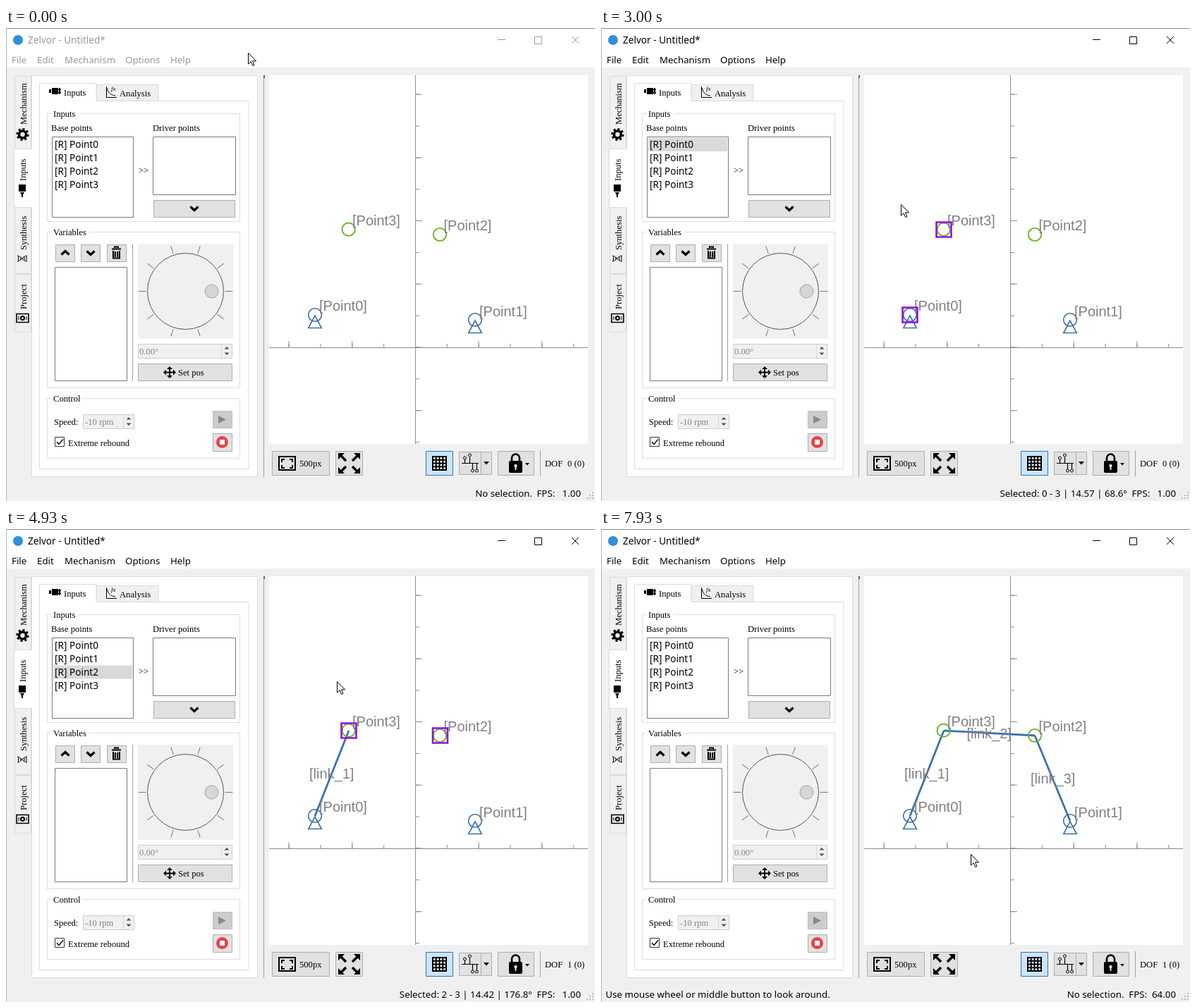
These frames come from a looping animation (835x671 px, 8000 ms). An HTML page:

```html
<!DOCTYPE html>
<html lang="en">
<head>
<meta charset="utf-8">
<title>Linkage editor</title>
<style>
html, body { margin: 0; width: 100%; height: 100%; overflow: hidden; background: #f0f0f0; }
svg { display: block; width: 835px; height: 671px; }
text { white-space: pre; }
.ui { font: 13.3px "Noto Sans", "Open Sans", sans-serif; }
.list { font-size: 13.6px; }
.serif { font: 12.6px "Liberation Serif", "Noto Serif", serif; }
.label { font: 20px "Liberation Sans", Arial, sans-serif; fill: #808080; }
.end { text-anchor: end; }
.btn { fill: #e1e1e1; stroke: #adadad; }
.off { fill: #ccc; stroke: #bfbfbf; }
.box { fill: #fff; stroke: #7a7a7a; }
.group { fill: none; stroke: #dcdcdc; }
.tab { fill: #f0f0f0; stroke: #d9d9d9; }
.page { fill: #fff; stroke: #dcdcdc; }
.spin { fill: #f0f0f0; stroke: #ccc; }
.dim { fill: #838383; }
.ink { fill: none; stroke: #000; }
.axis { fill: none; stroke: #8c8c8c; }
.ground { fill: none; stroke: #3a70a8; stroke-width: 1.6; }
.joint { fill: none; stroke: #63b51e; stroke-width: 1.8; }
.link { stroke: #3c72ad; stroke-width: 2.8; }
.pick { fill: none; stroke: #9112dc; stroke-width: 2.6; }
.row { fill: #d9d9d9; }
#band { fill: none; stroke: #a0a0a4; }
</style>
</head>
<body>
<svg viewBox="0 0 835 671">
<defs>
  <g id="frame">
    <path fill="none" stroke="currentColor" d="M697 16.5h11M749.5 12.5h10v10h-10zM802 12l10 10M812 12l-10 10"/>
    <g class="ui" fill="currentColor">
      <text class="list" x="31" y="22">Zelvor - Untitled*</text>
      <text x="8" y="50">File</text><text x="44" y="50">Edit</text>
      <text x="83" y="50">Mechanism</text><text x="169" y="50">Options</text><text x="233" y="50">Help</text>
    </g>
  </g>
  <g id="menu" class="ui">
    <path fill="#000" opacity=".35" d="M4 4h164v98H4z"/>
    <path fill="#f2f2f2" stroke="#c4c4c4" d="M.5.5h166v100H.5z"/>
    <path stroke="#000" stroke-width="2" fill="none" d="M9 10l5 9 6-10"/>
    <path d="M6 7h5v5H6zM18 6h5v5h-5zM12 17h4v4h-4zM149 53l4 3.5-4 3.5z"/>
    <path stroke="#c8c8c8" d="M29 72.5h135"/>
    <text x="33" y="18">New Link</text><text x="142" y="18">L</text>
    <text x="33" y="40">Grounded</text><text x="33" y="62">Multiple joint</text><text x="33" y="92">Delete</text>
  </g>
  <path id="chev" fill="none" stroke="#000" stroke-width="3.2" d="M-5.5-2.5L0 2.5 5.5-2.5"/>
  <path id="arrows" fill="#505050" d="M-3.5-2.5L0-6 3.5-2.5zM-3.5 2.5L0 6 3.5 2.5z"/>
  <g id="base" class="ground"><circle r="9.3"/><path d="M0 1L-9.3 18.5H9.3z"/></g>
  <circle id="joint" class="joint" r="9.2"/>
  <path id="pick" class="pick" d="M-10.5-10.5h21v21h-21z"/>
</defs>

<!-- window -->
<path fill="#f0f0f0" d="M0 0h835v671H0z"/>
<path fill="#fff" d="M0 0h835v56H0z"/>
<path stroke="#8a8a8a" fill="none" d="M0 .5h835"/>
<path stroke="#b4b4b4" fill="none" d="M.5 0v671"/>
<circle cx="17" cy="17" r="7" fill="#2f8fd8"/>
<use href="#frame" color="#999" data-on="0-2300"/>
<use href="#frame" color="#000" data-on="2300-8000"/>

<!-- side tabs -->
<path class="page" d="M36.5 67.5h320v569h-320z"/>
<path class="tab" d="M12.5 68.5h23v103h-23zM12.5 254.5h23v94h-23zM12.5 349.5h23v82h-23z"/>
<path fill="#fff" d="M11 172h27v82H11z"/><path class="group" d="M36 171.5H11.5v83H36"/>
<g class="serif">
  <text transform="translate(29 137) rotate(-90)">Mechanism</text>
  <text transform="translate(28 217) rotate(-90)">Inputs</text>
  <text transform="translate(29 315) rotate(-90)">Synthesis</text>
  <text transform="translate(29 399) rotate(-90)">Project</text>
</g>
<g class="ink">
  <circle cx="23.500" cy="151" r="5" stroke-width="3.600"/>
  <circle cx="23.500" cy="151" r="7.600" stroke-width="3" pathLength="16" stroke-dasharray="1"/>
  <path d="M16 323c5 0 8 8 14 8M16 331c5 0 8-8 14-8M17.500 324v6M21 325v4M26 325v4M29 324v6"/>
  <path stroke-width="1.600" d="M15 405.500h17v12H15z"/><circle cx="23.500" cy="411.500" r="2.500" stroke-width="2"/>
  <path d="M18 409v5M29 409v5"/>
</g>
<path d="M18 222h10v10H18zM20 233h6l-1.500 3h-3zM22 236h2v4h-2z"/>

<!-- inputs page -->
<path class="page" d="M47.5 103.500h296.500v522H47.500z"/>
<path class="tab" d="M128.500 80.500h87.500v23h-87.500z"/>
<path fill="#fff" d="M48 78h80v27H48z"/><path class="group" d="M47.500 104V78.500h80.500V103"/>
<path d="M61 87h3v5h-3zM65 85h9v9h-9zM75 85h2v9h-2z"/><path class="ink" stroke-width="1.500" d="M74 87.500h4M74 91.500h4"/>
<path class="ink" d="M142.500 83v15.500H157M143 85c2 7 5 10 12 11"/>
<text x="149" y="89" font-family="Liberation Serif, serif" font-size="9" font-style="italic">fx</text>
<path class="group" d="M58.500 121.500h273v153h-273zM58.500 289.500h273v221h-273zM58.500 525.500h273v85h-273z"/>
<path fill="#fff" d="M64 119h39v5H64zM64 287h54v5H64zM64 523h44v5H64z"/>
<g class="serif">
  <text x="82" y="96">Inputs</text><text x="161" y="97">Analysis</text>
  <text x="67" y="126">Inputs</text><text x="64" y="146">Base points</text><text x="208" y="146">Driver points</text>
  <text x="188" y="206">&gt;&gt;</text>
  <text x="67" y="294">Variables</text><text x="67" y="530">Control</text>
</g>
<path class="box" d="M65.500 154.500h115v114h-115zM208.500 154.500h117v82h-117zM69.500 339.500h102v161h-102z"/>
<path class="row" data-on="2890-3670" d="M67 156h112v19H67z"/>
<path class="row" data-on="5970-7000" d="M67 174.500h112v19H67z"/>
<path class="row" data-on="4090-5230" d="M67 193.500h112v19H67z"/>
<g class="ui list">
  <text class="list" x="69" y="170">[R] Point0</text><text class="list" x="69" y="189">[R] Point1</text>
  <text class="list" x="69" y="208">[R] Point2</text><text class="list" x="69" y="227">[R] Point3</text>
</g>
<path class="btn" d="M209.500 244.500h115v24h-115zM70.500 307.500h27v24h-27zM106.500 307.500h27v24h-27zM143.500 307.500h27v24h-27zM187.500 476.500h133v24h-133zM293.500 575.500h27v25h-27z"/>
<use href="#chev" x="267" y="256"/>
<use href="#chev" transform="translate(84 319) scale(1 -1)"/>
<use href="#chev" x="120" y="319"/>
<path class="ink" stroke-width="2" d="M150 313.500h13M154 312v-1.500h5v1.500M152 316v10.500h9V316M154.800 317v8M158.200 317v8"/>
<path stroke="#a0a0a0" d="M179.500 306v195"/>

<!-- dial -->
<path fill="#f0f0f0" d="M187 306h135v135H187z"/>
<circle cx="254.500" cy="373.500" r="54" fill="none" stroke="#555"/>
<circle cx="254.500" cy="373.500" r="61.500" fill="none" stroke="#777" stroke-width="11" pathLength="360" stroke-dasharray=".9 35.1" stroke-dashoffset=".45"/>
<circle cx="291.500" cy="373.500" r="9.500" fill="#d6d6d6" stroke="#a2a2a2"/>
<path class="spin" d="M187.500 448.500h133v20h-133zM109.500 548.500h72v20h-72z"/>
<path stroke="#d8d8d8" fill="none" d="M305.500 449v19M166.500 549v19"/>
<use href="#arrows" x="313" y="458"/><use href="#arrows" x="174" y="558"/>
<path class="ink" stroke-width="2" d="M232 482v13M225.500 488.500h13"/>
<path d="M232 480l4 4h-8zM232 497l4-4h-8zM223 488.500l4-4v8zM241 488.500l-4-4v8z"/>
<g class="serif">
  <text class="dim" x="189" y="463">0.00°</text><text x="244" y="493">Set pos</text>
  <text x="68" y="563">Speed:</text><text class="dim" x="112" y="563">-10 rpm</text>
  <text x="88" y="593">Extreme rebound</text>
</g>
<path class="btn off" d="M293.500 543.500h27v24h-27z"/><path fill="#888" d="M301 550l11 5.500-11 5.500z"/>
<circle cx="306.500" cy="587.500" r="8.500" fill="#e5444b"/><path fill="#fff" d="M303 584h7v7h-7z"/>
<path fill="#fff" stroke="#333" d="M69.500 580.500h13v13h-13z"/><path class="ink" stroke-width="1.400" d="M72 587l3 3.500 6-7"/>
<path stroke="#a0a0a0" d="M365.500 67v570"/><path stroke="#606060" stroke-width="2" d="M366 67v4"/>

<!-- canvas -->
<path fill="#fff" d="M373 67h452v523H373z"/>
<g class="axis">
  <path d="M373 453.500h452M580.500 67v523"/>
  <path stroke-width="5" stroke-dasharray="1 43.85" d="M400.600 450.500H824"/>
  <path stroke-width="9" stroke-dasharray="1 88.700" d="M400.600 448.500H824"/>
  <path stroke-width="5" stroke-dasharray="1 43.850" d="M583.500 93.700V590"/>
  <path stroke-width="9" stroke-dasharray="1 88.700" d="M585.500 93.700V590"/>
</g>
<g data-on="3670-8000"><path class="link" d="M438 407L486 286"/><text class="label" x="430" y="354">[link_1]</text></g>
<g data-on="5230-8000"><path class="link" d="M486 286L615 293"/><text class="label" x="518.500" y="297">[link_2]</text></g>
<g data-on="7000-8000"><path class="link" d="M615 293L665 414"/><text class="label" x="609" y="361">[link_3]</text></g>
<use href="#base" x="438" y="407"/><use href="#base" x="665" y="414"/>
<use href="#joint" x="615" y="293"/><use href="#joint" x="485.700" y="285.700"/>
<g class="label">
  <text x="444" y="401">[Point0]</text><text x="671" y="409">[Point1]</text>
  <text x="620.500" y="287">[Point2]</text><text x="491" y="280">[Point3]</text>
</g>
<use href="#pick" x="438" y="407" data-on="2890-3670"/>
<use href="#pick" x="665.500" y="414.500" data-on="5970-7000"/>
<use href="#pick" x="615.500" y="293" data-on="4090-5230 6135-7000"/>
<use href="#pick" x="486" y="286" data-on="2843-3670 4560-5230"/>
<rect id="band"/>

<!-- tool row -->
<path class="btn" d="M377.500 600.500h81v34h-81zM467.500 600.500h38v34h-38zM642.500 601.500h46v32h-46zM697.500 600.500h51v34h-51z"/>
<path fill="#cce4f7" stroke="#2a76b8" d="M595.500 600.500h38v34h-38z"/>
<path class="ink" stroke-width="2" d="M387 608h23v19h-23z"/>
<path class="ink" stroke-width="2" d="M391 616v-4h4M402 612h4v4M406 620v4h-4M395 624h-4v-4"/>
<path class="ink" stroke-width="3.500" d="M474 606l8 8M499 606l-8 8M474 630l8-8M499 630l-8-8"/>
<path d="M471 603h9l-9 9zM502 603v9l-9-9zM471 632v-9l9 9zM502 632h-9l9-9z"/>
<path fill="#fff" stroke="#000" stroke-width="2" d="M605 608h19v19h-19zM605 612.700h19M605 617.500h19M605 622.200h19M609.700 608v19M614.500 608v19M619.200 608v19"/>
<path class="ink" stroke-width="1.200" d="M646 617.500h24M650.500 617v-5M657.500 617v-8M661.500 618v8M667.500 618v8"/>
<g fill="#e1e1e1" stroke="#000"><circle cx="650.500" cy="610" r="2"/><circle cx="657.500" cy="606" r="2"/><circle cx="661.500" cy="628" r="2"/><circle cx="667.500" cy="628" r="2"/></g>
<path stroke="#adadad" d="M673.500 602v31"/><path d="M677 615h8l-4 4.500zM736 617h6l-3 3.500z"/>
<path class="ink" stroke-width="2.600" d="M717 615v-5a5.500 5.500 0 0 1 11 0v5"/><rect x="713" y="614" width="19" height="17" rx="2"/>
<circle cx="722.500" cy="621" r="2.200" fill="#e1e1e1"/><path fill="#e1e1e1" d="M721.500 621h2v6h-2z"/>
<path stroke="#a0a0a0" d="M757.500 599v37"/>
<g class="serif">
  <text x="416" y="622">500px</text><text x="764" y="622">DOF</text>
  <text x="796" y="622" data-on="0-3670">0 (0)</text>
  <text x="796" y="622" data-on="3670-5230 7000-8000">1 (0)</text>
  <text x="796" y="622" data-on="5230-7000">2 (0)</text>
</g>

<!-- status bar -->
<g class="ui">
  <text x="6.500" y="665" data-on="200-1470 1930-2300 3670-4000 5230-5820 7000-8000">Use mouse wheel or middle button to look around.</text>
  <g class="end">
    <text x="815" y="665" data-on="0-530 2950-3670 4730-5230 6400-7000">FPS:   1.00</text>
    <text x="815" y="665" data-on="530-2950 3670-4730 5230-6400 7000-8000">FPS:  64.00</text>
    <text x="746" y="665" data-on="0-530">No selection.</text>
    <text x="741.500" y="665" data-on="530-2843 3670-4090 5230-5970 7000-8000">No selection.</text>
    <text x="741.500" y="665" data-on="2843-2890">Selected: 3</text>
    <text x="746" y="665" data-on="2890-3670">Selected: 0 - 3 | 14.57 | 68.6°</text>
    <text x="741.500" y="665" data-on="4090-4560">Selected: 2</text>
    <text x="746" y="665" data-on="4560-5230">Selected: 2 - 3 | 14.42 | 176.8°</text>
    <text x="741.500" y="665" data-on="5970-6135">Selected: 1</text>
    <text x="746" y="665" data-on="6135-7000">Selected: 1 - 2 | 14.62 | 112.5°</text>
  </g>
</g>
<path fill="#b8b8b8" d="M831 658h2v2h-2zM827 662h2v2h-2zM831 662h2v2h-2zM823 666h2v2h-2zM827 666h2v2h-2zM831 666h2v2h-2z"/>

<use href="#menu" x="422" y="250" data-on="3070-3670"/>
<use href="#menu" x="466" y="216" data-on="5000-5230"/>
<use href="#menu" x="568" y="220" data-on="6570-7000"/>
<path id="cursor" fill="#fff" stroke="#000" d="M.5.5v15.600l3.700-3.400 2.500 5.800 2.300-1-2.500-5.700h5z"/>
</svg>
<script>
const LOOP = 8000;
// time, x, y
const path = [
  [0, 343, 35], [70, 343, 35], [330, 512, 300], [530, 512, 300],
  [700, 476, 250], [930, 520, 200], [1150, 590, 320], [1330, 611, 426],
  [1470, 611, 426], [1530, 567, 468], [2300, 567, 468], [2950, 425, 250],
  [3200, 425, 250], [3500, 480, 264], [3640, 500, 265], [3730, 558, 268],
  [4000, 636, 318], [4470, 520, 185], [4530, 520, 185], [4600, 464, 174],
  [4730, 469, 216], [5000, 469, 216], [5230, 520, 230], [5530, 716, 461],
  [5800, 716, 461], [6250, 580, 160], [6400, 571, 220], [6670, 571, 220],
  [6950, 625, 234], [7000, 625, 234], [7470, 562, 466], [7530, 562, 466],
  [7700, 524, 461], [LOOP, 524, 461]
];
const drags = [[2300, 2950], [4000, 4730], [5800, 6400]];
const cursor = document.getElementById("cursor");
const band = document.getElementById("band");
const parts = [...document.querySelectorAll("[data-on]")].map(el => ({
  el, spans: el.dataset.on.split(" ").map(s => s.split("-").map(Number))
}));

const within = (t, [from, to]) => t >= from && t < to;
const show = (el, on) => { el.style.visibility = on ? "visible" : "hidden"; };

function cursorAt(t) {
  const i = Math.max(1, path.findIndex(p => p[0] > t));
  const [t0, x0, y0] = path[i - 1], [t1, x1, y1] = path[i];
  const k = (t - t0) / (t1 - t0);
  return [Math.round(x0 + (x1 - x0) * k), Math.round(y0 + (y1 - y0) * k)];
}

function draw(t) {
  for (const { el, spans } of parts) show(el, spans.some(s => within(t, s)));
  const [x, y] = cursorAt(t);
  cursor.setAttribute("transform", `translate(${x} ${y})`);
  const drag = drags.find(d => within(t, d));
  show(band, drag);
  if (drag) {
    const [sx, sy] = cursorAt(drag[0]);
    const box = { x: Math.min(x, sx) + .5, y: Math.min(y, sy) + .5, width: Math.abs(x - sx), height: Math.abs(y - sy) };
    for (const key in box) band.setAttribute(key, box[key]);
  }
}

const start = performance.now();
function tick() {
  draw((performance.now() - start) % LOOP);
  requestAnimationFrame(tick);
}
tick();
</script>
</body>
</html>
```
